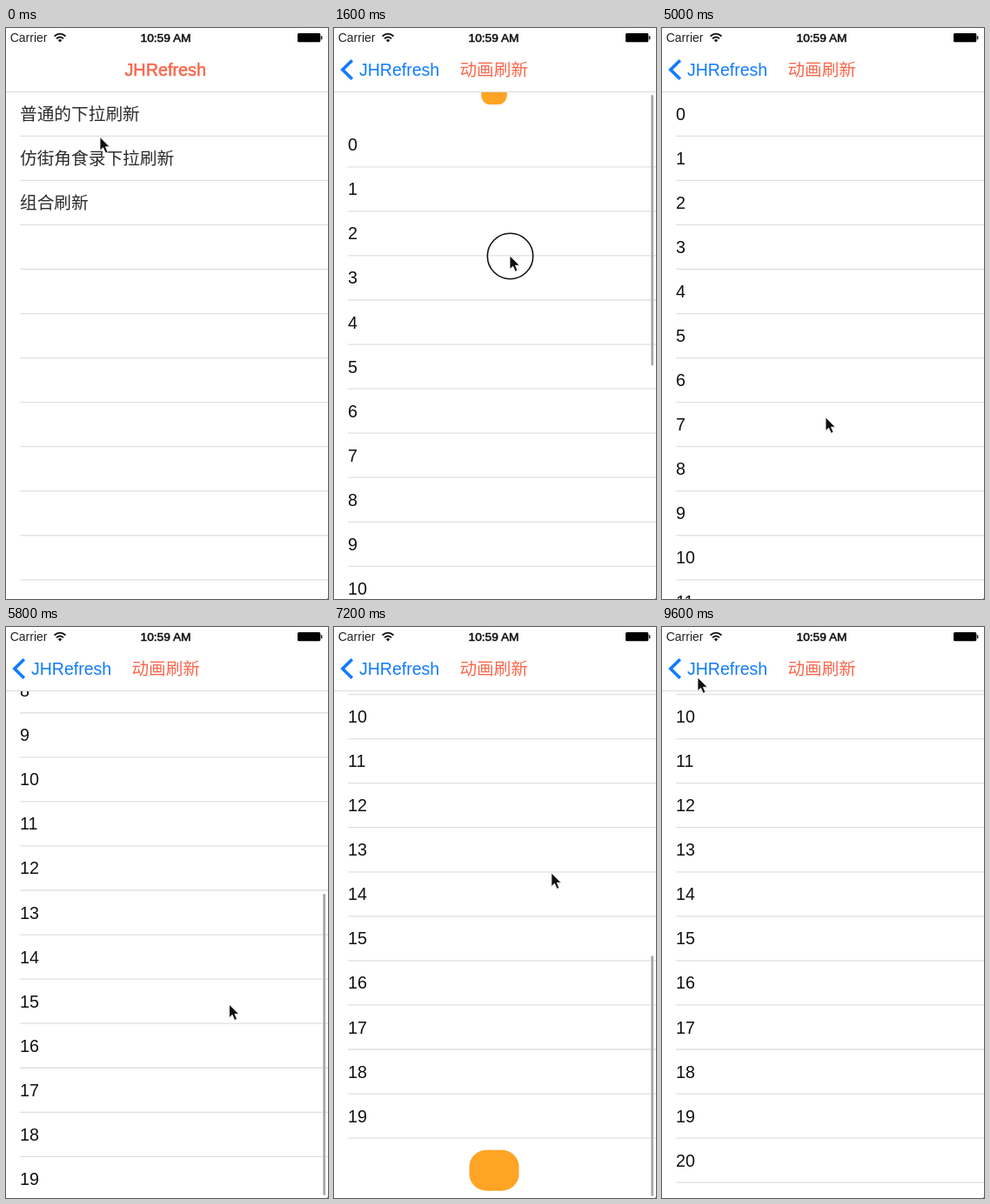
An HTML page for the animation above (9.7 s loop, 370 by 657 pixels).

```html
<!DOCTYPE html>
<html lang="zh-CN">
<head>
<meta charset="utf-8">
<title>JHRefresh</title>
<style>
  html, body { margin: 0; width: 100%; height: 100%; overflow: hidden; background: #fff; }
  svg { display: block; width: 370px; height: 657px; }
  text { font-family: "Liberation Sans", "Noto Sans CJK SC", "Noto Sans CJK", sans-serif; }
  .row { font-size: 19.7px; fill: #111; }
  .cjk { font-family: "Noto Sans CJK SC", "Noto Sans CJK", sans-serif; font-weight: 300; }
  .menu { fill: #2c2c2c; }
  .line { stroke: #e0e0e0; stroke-width: 1.3; }
  .title { fill: #f9664b; text-anchor: middle; }
  .medium { stroke-width: .55; }
</style>
</head>
<body>
<svg viewBox="0 0 370 657">
  <rect width="370" height="657" fill="#fff"/>
  <g id="menu">
    <rect id="highlight" y="124" width="370" height="51" fill="#d9d9d9"/>
  </g>
  <g id="page">
    <rect y="73" width="370" height="584" fill="#fff"/>
    <g id="rows"></g>
    <rect id="header" fill="#ffa424"/>
    <rect id="footer" fill="#ffa424"/>
    <rect id="bar" x="364.3" width="2.8" rx="1.4" fill="#a8a8a8"/>
  </g>

  <rect width="370" height="73" fill="#fff"/>
  <path d="M0 73.5H370" stroke="#dadada" stroke-width="1.2"/>
  <text x="4.7" y="16" font-size="14" fill="#222">Carrier</text>
  <path d="M55.5 9.5Q62 3.7 68.5 9.5M58 12.3Q62 8.8 66 12.3" fill="none" stroke="#111" stroke-width="1.8"/>
  <path d="M59.8 14Q62 12.2 64.2 14L62 16.5Z" fill="#111"/>
  <text class="medium" x="183.5" y="16" font-size="13.7" text-anchor="middle" fill="#111" stroke="#111">10:59 AM</text>
  <rect x="335" y="6" width="26.3" height="10.3" rx="1.5" fill="#000"/>
  <path d="M362.6 9.2V13.2" stroke="#222" stroke-width="1.6"/>

  <text id="homeTitle" class="title medium" x="183.2" y="54.8" font-size="19.8" stroke="#f9664b">JHRefresh</text>
  <text id="pageTitle" class="title cjk" x="183.7" y="55.2" font-size="19.6" style="font-weight:500">动画刷新</text>
  <g id="back">
    <path d="M20.8 37.2L9.8 48L20.8 58.8" fill="none" stroke="#0f7bff" stroke-width="3.6"/>
    <text id="backLabel" x="29" y="54.8" font-size="19.5" fill="#0f7bff">JHRefresh</text>
  </g>

  <path d="M369 656.5H370" stroke="#777"/>
  <g id="pointer">
    <circle id="touch" r="26.2" cx=".5" cy=".5" fill="none" stroke="#111" stroke-width="1.6"/>
    <path d="M0 0V15.5L3.6 12.2L6.3 18.3L9 17.1L6.4 11.2H11.2Z" fill="#111" stroke="#fff" stroke-width=".8"/>
  </g>
</svg>
<script>
const LOOP = 9700, STEP = 100;
const ROW = 51.06, FIRST_LINE = 124.3, FIRST_TEXT = 105.8;
const MAX_SCROLL = 436, REFRESH = 70, ROW_COUNT = 20;
const $ = id => document.getElementById(id);

function add(parent, tag, attrs, text) {
  const el = document.createElementNS("http://www.w3.org/2000/svg", tag);
  for (const k in attrs) el.setAttribute(k, attrs[k]);
  if (text !== undefined) el.textContent = text;
  return parent.appendChild(el);
}

function addRow(parent, i, label, cls = "row") {
  const g = add(parent, "g", {});
  add(g, "path", { class: "line", d: `M16 ${FIRST_LINE + ROW * i}H370` });
  if (label !== undefined) add(g, "text", { class: cls, x: 16, y: FIRST_TEXT + ROW * i }, label);
  return g;
}

const menuLabels = ["普通的下拉刷新", "仿街角食录下拉刷新", "组合刷新"];
for (let i = 0; i < 11; i++) addRow($("menu"), i, menuLabels[i], "row cjk menu");
for (let i = 0; i < ROW_COUNT; i++) addRow($("rows"), i, i);
const loadedRow = addRow($("rows"), ROW_COUNT, ROW_COUNT);

const clamp = (v, a = 0, b = 1) => Math.min(b, Math.max(a, v));
const mix = (a, b, u) => a + (b - a) * u;
const curves = {
  linear: u => u,
  out: u => 1 - (1 - u) ** 3,
  both: u => u * u * (3 - 2 * u)
};

// Keys are [time, value, curve leading into the value].
function track(keys, t) {
  let prev = keys[0];
  for (const key of keys) {
    if (t < key[0]) {
      const u = clamp((t - prev[0]) / (key[0] - prev[0]));
      return mix(prev[1], key[1], curves[key[2] || "both"](u));
    }
    prev = key;
  }
  return prev[1];
}

const pointerX = [[0, 108], [500, 110], [1050, 200], [1600, 202], [2300, 207], [4300, 207],
  [5000, 188], [5400, 214], [5850, 258], [6500, 268.3], [6800, 268.3], [7700, 224], [9100, 224], [9600, 41]];
const pointerY = [[0, 125.5], [300, 146], [500, 146], [1050, 192], [1600, 262, "linear"], [2200, 344, "out"],
  [4300, 344], [5000, 448], [5100, 455], [5400, 270], [5850, 440], [6500, 233], [6800, 233],
  [7700, 353], [9100, 353], [9600, 58]];
const scroll = [[1100, 0], [1600, -35.5, "linear"], [2200, -76, "out"], [2300, -76], [2600, -70, "out"],
  [4300, -70], [4700, 0, "out"], [5100, 0], [5400, 190, "linear"], [5900, 436, "out"],
  [6500, 560, "out"], [6800, 560], [7200, 506.3, "out"]];
const push = [[500, 0], [1000, 1, "out"]];
const barAlpha = [[1100, 0], [1200, 1], [3100, 1], [3400, 0], [5100, 0], [5200, 1], [7300, 1], [7600, 0]];
const touches = [[300, 500], [1100, 2300], [5100, 5400], [5900, 6800]];
const within = (t, [a, b]) => t >= a && t < b;

const set = (id, attrs) => { for (const k in attrs) $(id).setAttribute(k, attrs[k]); };
const show = (id, on) => set(id, { visibility: on ? "visible" : "hidden" });

function badge(id, y, pull, loading, t) {
  const scale = clamp(pull / 60);
  const sway = loading ? Math.sin(t / 100 * Math.PI / 2) * 0.7 : 0;
  const w = loading ? 57 + sway : 50 * scale;
  const h = loading ? 47 - sway : 46 * scale;
  set(id, { x: 184 - w / 2, y: y - h / 2, width: w, height: h, rx: w * 0.36, ry: h * 0.4 });
  show(id, pull > 0);
}

function draw(t) {
  const p = track(push, t);
  const offset = track(scroll, t);
  set("menu", { transform: `translate(${-110 * p} 0)` });
  set("page", { transform: `translate(${370 * (1 - p)} 0)` });
  set("rows", { transform: `translate(0 ${-offset})` });
  show("highlight", within(t, [400, 1000]));

  set("homeTitle", { opacity: clamp(1 - p * 1.6), x: mix(183.2, 75, p) });
  set("pageTitle", { opacity: p, x: mix(320, 183.7, p) });
  set("back", { opacity: p });
  set("backLabel", { x: mix(136, 29, p) });

  const loaded = t >= 8900;
  const held = within(t, [2300, 4700]);
  const top = Math.max(0, -offset);
  const bottom = Math.max(0, offset - MAX_SCROLL);
  const lastLine = FIRST_LINE + ROW * (ROW_COUNT - 1) - offset;
  badge("header", 73 + top - 34, top, held, t);
  badge("footer", lastLine + 37, loaded ? 0 : bottom, t >= 6800, t);
  loadedRow.setAttribute("visibility", loaded ? "visible" : "hidden");

  const length = 347 - (held ? top * 20 / REFRESH : top) - bottom;
  const barY = bottom ? 655 - length : 77 + 231 * Math.max(0, offset) / MAX_SCROLL;
  set("bar", { y: barY, height: length, opacity: track(barAlpha, t) });

  set("pointer", { transform: `translate(${track(pointerX, t)} ${track(pointerY, t)})` });
  show("touch", touches.some(span => within(t, span)));
}

const start = performance.now();
function tick() {
  const t = (performance.now() - start) % LOOP;
  draw(Math.floor(t / STEP) * STEP);
  requestAnimationFrame(tick);
}
tick();
</script>
</body>
</html>
```
